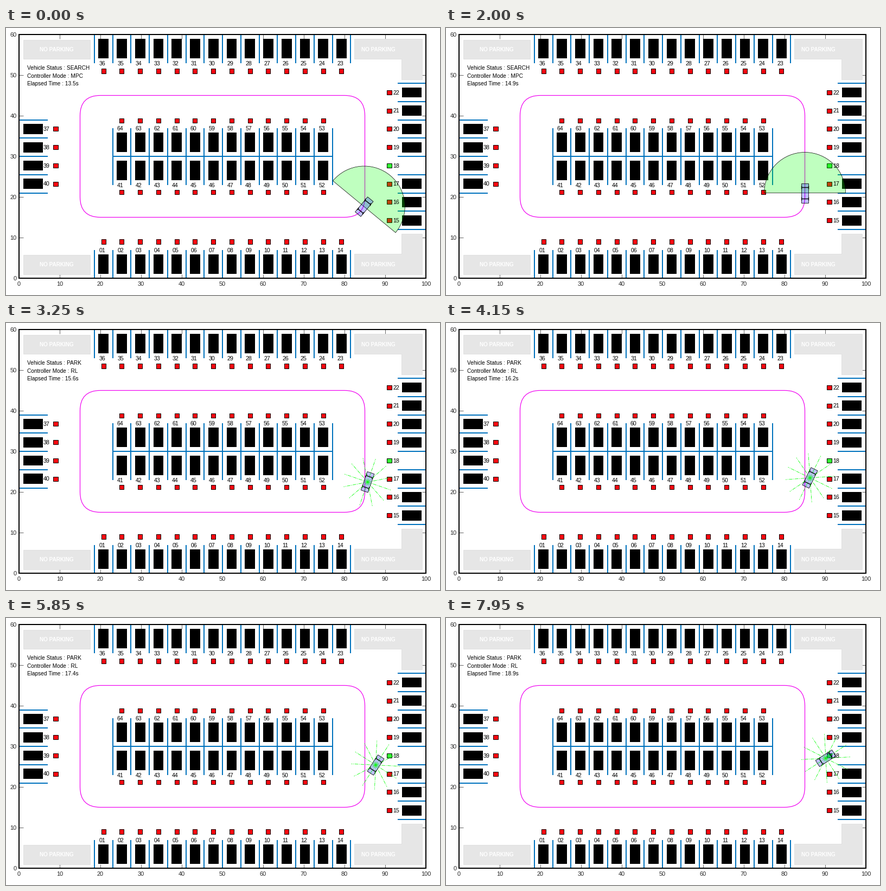
Write a matplotlib script that moves like this. It is 800 by 493 pixels and loops after 8000 ms.

```python
import numpy as np
import matplotlib.pyplot as plt
from matplotlib.animation import FuncAnimation
from matplotlib.collections import LineCollection
from matplotlib.patches import FancyBboxPatch, Polygon, Rectangle, Wedge

plt.rcParams["font.family"] = "Liberation Sans"

DPI = 64
PX = 72 / DPI            # one pixel in points
UNIT = 7.5               # pixels per metre
STEP = 50                # ms per frame
LOOP = 8000
PARK_START = 2150
FREE_SPOT = 18
BLUE = "#0072bd"
GREY = "#e6e6e6"

fig = plt.figure(figsize=(800 / DPI, 493 / DPI), dpi=DPI, facecolor="white")
ax = fig.add_axes([0, 0, 1, 1])
ax.set_xlim(-24 / UNIT, 776 / UNIT)
ax.set_ylim(-31 / UNIT, 462 / UNIT)
ax.axis("off")


def line(xs, ys, color, width, z):
    ax.plot(xs, ys, color=color, lw=width * PX, zorder=z, solid_capstyle="butt")


def box(x, y, w, h, color, z, edge="none", width=0):
    """Rectangle around a centre point."""
    ax.add_patch(Rectangle((x - w / 2, y - h / 2), w, h, facecolor=color,
                           edgecolor=edge, lw=width * PX, zorder=z))


def label(x, y, text, size=10.6, color="black", ha="center", weight="normal"):
    """Text whose capitals are centred on y; size in pixels."""
    return ax.text(x, y - 0.36 * size / UNIT, text, fontsize=size * PX, color=color,
                   ha=ha, va="baseline", weight=weight, zorder=8)


def spot(number, car, mark, text, upright):
    w, h = (2.5, 4.8) if upright else (4.8, 2.5)
    free = number == FREE_SPOT
    if not free:
        box(*car, w, h, "black", 2.5)
    box(*mark, 1.07, 1.07, "#33ff33" if free else "#fa0510", 4, "black", 1)
    label(*text, f"{number:02d}")


def draw_spots():
    for k in range(14):
        x = 20.75 + 4.5 * k
        spot(k + 1, (x, 3.5), (x, 9), (x - 0.3, 6.93), True)
        spot(36 - k, (x, 56.5), (x, 51), (x - 0.3, 52.93), True)
    for k in range(8):
        y = 14.25 + 4.5 * k
        spot(15 + k, (96.5, y), (91, y), (92.73, y), False)
    for k in range(4):
        y = 36.75 - 4.5 * k
        spot(37 + k, (3.5, y), (9, y), (6.73, y), False)
    for k in range(12):
        x = 25.25 + 4.5 * k
        spot(41 + k, (x, 26.5), (x, 21.15), (x - 0.35, 22.93), True)
        spot(64 - k, (x, 33.5), (x, 38.85), (x - 0.35, 36.93), True)


def draw_bay_lines():
    for x in 18.5 + 4.5 * np.arange(15):
        line([x, x], [0, 7], BLUE, 2, 2)
        line([x, x], [53, 60], BLUE, 2, 2)
    for x in 23 + 4.5 * np.arange(13):
        line([x, x], [23, 37], BLUE, 2, 2)
    line([23, 77], [30, 30], BLUE, 2, 2)
    for y in 12 + 4.5 * np.arange(9):
        line([93, 100], [y, y], BLUE, 2, 2)
    for y in 21 + 4.5 * np.arange(5):
        line([0, 7], [y, y], BLUE, 2, 2)


def draw_no_parking():
    corner = np.array([(82.4, 1), (99, 1), (99, 11), (94, 11), (94, 6), (82.4, 6)])
    shapes = [corner, corner * (1, -1) + (0, 60)]
    for low, high in ((1, 5.7), (54, 58.67)):
        shapes.append([(1, low), (17.5, low), (17.5, high), (1, high)])
    for shape in shapes:
        ax.add_patch(Polygon(shape, facecolor=GREY, edgecolor="#d9d9d9",
                             lw=0.7 * PX, zorder=1))
    for x in (9.2, 88.33):
        for y in (3.35, 56.4):
            label(x, y, "NO PARKING", 10, "white", weight="bold")


def draw_frame():
    ink = "#262626"
    for x in range(0, 101, 10):
        line([x, x], [0, 1], ink, 0.7, 0)
        line([x, x], [59, 60], ink, 0.7, 0)
        label(x, -1.4, str(x), 11, ink)
    for y in range(0, 61, 10):
        line([0, 1], [y, y], ink, 0.7, 0)
        line([99, 100], [y, y], ink, 0.7, 0)
        label(-0.55, y, str(y), 11, ink, ha="right")
    box(50, 30, 100, 60, "none", 7.5, "black", 2)


draw_frame()
draw_no_parking()
draw_bay_lines()
draw_spots()
ax.add_patch(FancyBboxPatch((15, 15), 70, 30, boxstyle="round,pad=0,rounding_size=5",
                            facecolor="none", edgecolor="#f000f0", lw=1.2 * PX, zorder=3))

# Moving parts
status, mode, clock = (label(2, y, "", 10.1, ha="left") for y in (51.87, 49.87, 47.9))
scan = Wedge((0, 0), 10, 0, 180, facecolor=(0, 1, 0, 0.25), edgecolor="black",
             lw=0.7 * PX, zorder=5)
body = Polygon([(0, 0)] * 4, facecolor=(0, 0, 1, 0.25), edgecolor="black",
               lw=0.8 * PX, zorder=6)
ax.add_patch(scan)
ax.add_patch(body)
wheels = LineCollection([], colors="black", linewidths=1.4 * PX, zorder=6.5)
rays = LineCollection([], colors=[(0, 1, 0)], linewidths=0.8 * PX,
                      linestyles=[(0, (8, 2, 1.5, 2))], zorder=7)
ax.add_collection(wheels, autolim=False)
ax.add_collection(rays, autolim=False)

# Poses: time in ms, x, y, heading, steering
SEARCH = np.array([
    (0, 84.84, 17.60, 50.4, 25),
    (500, 85.03, 18.42, 70, 16),
    (1000, 85.10, 19.27, 83, 8),
    (1500, 85.05, 20.16, 89, 2),
    (1950, 85.00, 21.00, 90, 0),
])
PARK = np.array([
    (PARK_START, 85.00, 21.00, 90, -30),
    (3250, 85.68, 22.44, 71, -20),
    (4150, 86.27, 23.47, 64, -8),
    (5850, 87.67, 25.40, 57.2, -10),
    (7050, 88.89, 26.40, 45, -20),
    (7950, 90.13, 27.07, 33, -20),
])


def pose(t, keys):
    """Cubic Hermite curve through the key poses."""
    times, rows = keys[:, 0], keys[:, 1:]
    t = np.clip(t, times[0], times[-1])
    slopes = np.gradient(rows, times, axis=0)
    i = min(np.searchsorted(times, t, "right") - 1, len(times) - 2)
    span = times[i + 1] - times[i]
    s = (t - times[i]) / span
    return ((1 + 2 * s) * (1 - s) ** 2 * rows[i] + s * (1 - s) ** 2 * span * slopes[i]
            + s * s * (3 - 2 * s) * rows[i + 1] + s * s * (s - 1) * span * slopes[i + 1])


def direction(deg):
    a = np.radians(deg)
    return np.array([np.cos(a), np.sin(a)])


def place_car(x, y, heading, steer):
    centre = np.array([x, y])
    ahead, left = direction(heading), direction(heading + 90)
    body.set_xy([centre + a * ahead + b * left
                 for a, b in ((2.4, 0.9), (2.4, -0.9), (-2.4, -0.9), (-2.4, 0.9))])
    parts = []
    for offset, turn in ((1.4, steer), (-1.4, 0)):
        hub = centre + offset * ahead
        parts.append([hub - 0.85 * left, hub + 0.85 * left])
        roll = 0.35 * direction(heading + turn)
        for side in (-0.85, 0.85):
            wheel = hub + side * left
            parts.append([wheel - roll, wheel + roll])
    wheels.set_segments(parts)


def update(i):
    t = i * STEP
    parking = t >= PARK_START
    x, y, heading, steer = pose(t, PARK if parking else SEARCH)
    place_car(x, y, heading, steer)

    scan.set_visible(not parking)
    scan.set_center((x, y))
    scan.set_theta1(heading - 90)
    scan.set_theta2(heading + 90)
    rays.set_visible(parking)
    rays.set_segments([[(x, y), (x, y) + 6 * direction(heading + 30 * k)]
                       for k in range(12)])

    seconds = np.interp(t, [0, 1950, PARK_START, 3250, 7950],
                        [13.5, 14.865, 14.88, 15.58, 18.87])
    status.set_text("Vehicle Status : " + ("PARK" if parking else "SEARCH"))
    mode.set_text("Controller Mode : " + ("RL" if parking else "MPC"))
    clock.set_text(f"Elapsed Time : {seconds:.1f}s")
    return scan, body, wheels, rays, status, mode, clock


anim = FuncAnimation(fig, update, frames=LOOP // STEP, interval=STEP,
                     repeat=True, repeat_delay=0)
plt.show()
```
